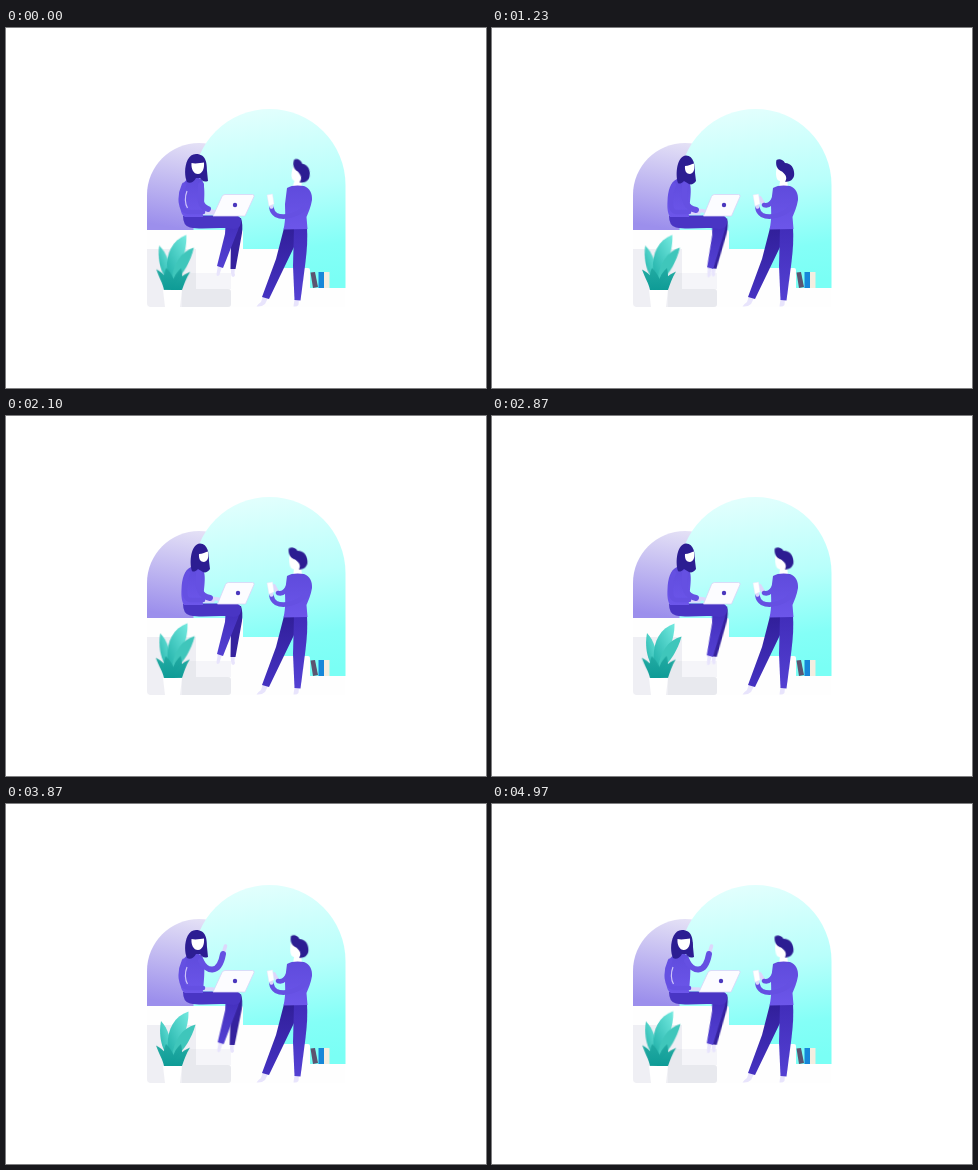
An HTML page for the animation above (5010 ms loop, 480 px wide and 360 px high).

```html
<!DOCTYPE html>
<html lang="en">
<head>
<meta charset="utf-8">
<title>Two colleagues</title>
<style>
html, body { margin: 0; width: 100%; height: 100%; overflow: hidden; background: #fff; }
svg { display: block; width: 480px; height: 360px; }

.move { animation: 5010ms ease-in-out infinite; }
.sleeve { fill: none; stroke: #6550e2; stroke-width: 6; stroke-linecap: round; stroke-linejoin: round; }
.sleeve.thin { stroke-width: 4.6; }
.hand { fill: none; stroke: #ddd7fb; stroke-width: 3.6; stroke-linecap: round; }
.hair { fill: #2c1d92; }
.skin { fill: #fff; }
.foot { fill: #e8e4fc; }

/* Seated woman */
.front-leg, .back-leg { transform-origin: 229px 192px; }
.front-leg { animation-name: front-leg; }
.back-leg { animation-name: back-leg; }
@keyframes front-leg {
  0%, 41.8%, 84% { transform: rotate(0); }
  20.5%, 24.5%, 60% { transform: rotate(-5deg); }
  57.3%, 99.2%, 100% { transform: rotate(-4.6deg); }
  69.9% { transform: rotate(-1.8deg); }
}
@keyframes back-leg {
  0%, 41.8%, 84% { transform: rotate(0); }
  20.5%, 24.5%, 60% { transform: rotate(6deg); }
  57.3%, 99.2%, 100% { transform: rotate(5.6deg); }
  69.9% { transform: rotate(2.2deg); }
}
.bob { animation-name: bob; }
@keyframes bob {
  0%, 6%, 69%, 100% { d: path("M181 154C177 146 179 126 190 126C200 126 201 135 201 143L202 153C198 154.500 196 153 194 150L190 150C188 154 184 156 181 154Z"); }
  19%, 58.5% { d: path("M186 155C183 146 185 128 194 127.500C202 128 203 137 203 145L204 153C202 156 199 157 197 156L192 153C189 156 187 156 186 155Z"); }
}
.face { animation-name: face; }
@keyframes face {
  0%, 6%, 69%, 100% { d: path("M185.500 135C189 136 195 135 198 134.500C198.500 141 196.500 145.500 192 146C187.500 146 185 141 185.500 135Z"); }
  19%, 58.5% { d: path("M193 138C196 138 200 136 202 135.500C203 141 202 145 198 146C194.500 146 192.500 143 193 138Z"); }
}
.seam { animation-name: seam; }
@keyframes seam {
  0%, 6%, 69%, 100% { opacity: .9; }
  18%, 59% { opacity: 0; }
}
.torso { animation-name: torso; }
@keyframes torso {
  0%, 6%, 69%, 100% { d: path("M182 151C176 154 174 163 174 173C174 181 175 187 179 189L197 189C198 176 200 158 196 152C193 149 186 149 182 151Z"); }
  19%, 58.5% { d: path("M185 151C178 154 176 163 175.500 173C175 181 176 186 178 189L197 189C197 176 201 160 197 154C194 150 189 149 185 151Z"); }
}
.near-arm { animation-name: near-arm; }
@keyframes near-arm {
  0%, 6%, 69%, 100% { d: path("M178 157C173 168 173.500 183 182 184L197 184"); }
  19%, 58.5% { d: path("M182 157C177.500 168 177 183 184 184L197 184"); }
}
.wave { animation-name: wave; }
@keyframes wave {
  0%, 6% { d: path("M195 157C195 168 192 178 202 181"); }
  19%, 60% { d: path("M193 157C191 171 193 180 204 182"); }
  69.9% { d: path("M195 157C196 172 200 178 212 169"); }
  77%, 99.2%, 100% { d: path("M195 157C200 167 213 172 217 150"); }
  84.6%, 91% { d: path("M195 157C200 167 213 172 214 149"); }
}
.palm { animation-name: palm; }
@keyframes palm {
  0%, 6% { d: path("M202 182L209 184"); }
  19%, 60% { d: path("M204 182L212 183"); }
  69.9% { d: path("M212 169L219 165"); }
  77%, 99.2%, 100% { d: path("M217 150L219.500 142"); }
  84.6%, 91% { d: path("M214 149L215.500 141"); }
}
.screen { animation-name: screen; }
@keyframes screen {
  0%, 6%, 69%, 100% { d: path("M219 166.500L246.500 166.500Q248.500 166.500 248 168.500L239 188L207 188L216 168.500Q217 166.500 219 166.500Z"); }
  19%, 58.5% { d: path("M222.500 166.500L246.500 166.500Q248.500 166.500 248 168.500L239.500 188L211.500 188L219.500 168.500Q220.500 166.500 222.500 166.500Z"); }
}
.dot { animation-name: dot; }
@keyframes dot {
  0%, 6%, 69%, 100% { transform: none; }
  19%, 58.5% { transform: translateX(3px); }
}

/* Standing man */
.nod { transform-origin: 290px 156px; animation-name: nod; }
@keyframes nod {
  0%, 5% { transform: rotate(9deg); }
  24.5% { transform: rotate(0); }
  41.9%, 58% { transform: rotate(-4deg); }
  69.9% { transform: rotate(5deg); }
  84.6% { transform: rotate(-2deg); }
  99.2%, 100% { transform: rotate(-4deg); }
}
.reach { animation-name: reach; }
@keyframes reach {
  0%, 5% { opacity: 0; }
  12%, 100% { opacity: 1; }
}

/* Plant */
.leaf { transform-origin: 167px 258px; animation-name: sway; }
.leaf.low { animation-name: sway-low; }
@keyframes sway {
  0%, 24.5% { transform: rotate(-2.5deg); }
  57.3%, 84.6% { transform: rotate(0); }
  99.2%, 100% { transform: rotate(-1.5deg); }
}
@keyframes sway-low {
  0%, 100% { transform: rotate(1deg); }
  50% { transform: rotate(-1deg); }
}
</style>
</head>
<body>
<svg viewBox="0 0 480 360">
  <defs>
    <linearGradient id="lilac" x1=".65" y1="0" x2=".45" y2="1">
      <stop offset="0" stop-color="#e6e3f6"/><stop offset="1" stop-color="#9c8fec"/>
    </linearGradient>
    <linearGradient id="aqua" x1=".44" y1="0" x2=".56" y2="1">
      <stop offset="0" stop-color="#e2fffd"/><stop offset=".45" stop-color="#b8fffb"/>
      <stop offset=".8" stop-color="#84fff7"/><stop offset="1" stop-color="#7afff5"/>
    </linearGradient>
    <linearGradient id="shirt" x1="0" y1="0" x2="0" y2="1">
      <stop offset="0" stop-color="#5f4bdc"/><stop offset="1" stop-color="#6c56ea"/>
    </linearGradient>
    <linearGradient id="jeans" x1="0" y1="0" x2="0" y2="1">
      <stop offset="0" stop-color="#412dba"/><stop offset="1" stop-color="#5340d2"/>
    </linearGradient>
    <linearGradient id="shade" x1="0" y1="0" x2="0" y2="1">
      <stop offset="0" stop-color="#311f9a"/><stop offset="1" stop-color="#4532c2"/>
    </linearGradient>
    <linearGradient id="mint" x1="1" y1="0" x2="0" y2="1">
      <stop offset="0" stop-color="#74eae0"/><stop offset="1" stop-color="#1fb0a8"/>
    </linearGradient>
    <linearGradient id="teal" x1="0" y1="0" x2="0" y2="1">
      <stop offset="0" stop-color="#22aaa2"/><stop offset="1" stop-color="#0e9b96"/>
    </linearGradient>
  </defs>

  <!-- Arches -->
  <path fill="url(#lilac)" d="M141 203V167A52 52 0 0 1 245 167V203Z"/>
  <path fill="url(#aqua)" d="M187.500 260V157A76 76 0 0 1 339.500 157V260Z"/>

  <!-- Stairs -->
  <path fill="#fefefe" d="M141 202H235Q237 202 237 204V221H276V240H302Q304 240 304 242V260H339V279H141Z"/>
  <path fill="#efeff4" d="M141 221H190V262H176V279H145Q141 279 141 275Z"/>
  <path fill="#e8e9ee" d="M176 247Q176 245 178 245H190V261H222Q225 261 225 264V276Q225 279 222 279H176Z"/>
  <path fill="#f5f5f9" d="M190 245H225V261H190Z"/>

  <!-- Books -->
  <path fill="#5c5470" d="M304.500 244.500L309 244L312 259L307 260Z"/>
  <rect fill="#1687d9" x="312.500" y="244" width="5.500" height="16"/>
  <rect fill="#f4eee0" x="318" y="244" width="5.500" height="16"/>

  <!-- Plant -->
  <path class="leaf move" fill="url(#mint)" d="M160 250C154 240 153 227 155 217C162 224 166 237 166 252Z"/>
  <path class="leaf move" fill="url(#mint)" d="M162 248C160 229 166 213 182.500 207.500C183 222 176 239 167 251Z"/>
  <path class="leaf move" fill="#3fc6bb" d="M166 253C168 236 176 224 189.500 220.500C186 234 178 246 170 253Z"/>
  <g class="leaf low move" fill="url(#teal)">
    <path d="M158 262C157 256 153 250 150 241.500C157 245 164 252 167 262Z"/>
    <path d="M161 262C157 254 157 246 160 240C166 246 170 254 170 262Z"/>
    <path d="M165 262C166 252 169 245 175 240C177 249 176 257 173 262Z"/>
    <path d="M167 262C169 253 176 247 184 243.500C180 250 178 256 176 262Z"/>
  </g>
  <path fill="#fff" d="M157 262H176L174 279H159Z"/>

  <!-- Seated woman -->
  <g class="back-leg move">
    <path class="foot" d="M225 239L229 239L228.500 245Q230 248 227 249Q225 248 225 245Z"/>
    <path fill="#35229e" d="M222 190L235 190Q237 196 236 205L229.500 241L224.500 241L225 210Z"/>
  </g>
  <g class="front-leg move">
    <path class="foot" d="M212 237L216 239L214 245Q214 248 211 248Q210 246 211 243Z"/>
    <path fill="url(#jeans)" d="M220 190L233 189Q235 194 232 202L217 240L211 238L219 206Z"/>
  </g>
  <path fill="#4935c4" d="M177 188C190 187 226 187.500 232 188Q237 191 234 198Q231 202 224 200.500C210 199 196 202 184 199.500Q177 198 177 188Z"/>
  <path class="torso move" fill="url(#shirt)" d="M182 151C176 154 174 163 174 173C174 181 175 187 179 189L197 189C198 176 200 158 196 152C193 149 186 149 182 151Z"/>
  <path class="hand" d="M198 185L207 185"/>
  <path class="sleeve thin near-arm move" d="M178 157C173 168 173.500 183 182 184L197 184"/>
  <path class="seam move" fill="none" stroke="#d8d0fb" stroke-width="1.200" d="M181 163C178.500 169 179 176 181.500 180"/>
  <path class="hand palm move" d="M202 182L209 184"/>
  <path class="sleeve wave move" d="M195 157C195 168 192 178 202 181"/>
  <path class="hair bob move" d="M181 154C177 146 179 126 190 126C200 126 201 135 201 143L202 153C198 154.500 196 153 194 150L190 150C188 154 184 156 181 154Z"/>
  <path class="skin face move" d="M185.500 135C189 136 195 135 198 134.500C198.500 141 196.500 145.500 192 146C187.500 146 185 141 185.500 135Z"/>
  <path class="screen move" fill="#fcfcff" stroke="#d9d4f6" stroke-width=".8" d="M219 166.500L246.500 166.500Q248.500 166.500 248 168.500L239 188L207 188L216 168.500Q217 166.500 219 166.500Z"/>
  <circle class="dot move" fill="#4a37bd" cx="229" cy="177" r="2.200"/>

  <!-- Standing man -->
  <path class="foot" d="M257 268L262 270L259 276Q256 279 250.500 278.500Q252 276 255 274Z"/>
  <path class="foot" d="M288.500 271L293 271L292.500 277Q291 279 287.500 278.500Z"/>
  <path fill="url(#shade)" d="M278 200L292 200L289 217L263 271L256 269L270 231Z"/>
  <path fill="url(#jeans)" d="M288 200L301 200Q302 214 299.500 234L294.500 272.500L288.500 272L287 238Z"/>
  <g class="nod move">
    <path class="skin" d="M285 138C283 145 284 153 288 153L287 160H296L295 150C299 144 295 136 291 136Z"/>
    <path class="hair" d="M284.500 132C287 130.500 291 131 293 135C300 135 303 142 302 148C301 152 297 154.500 293 153.500C296 149 293 146 290 143.500C286 142 283 138 284.500 132Z"/>
  </g>
  <g class="reach move">
    <path class="hand" d="M272 177L268 170"/>
    <path class="sleeve thin" d="M283 168Q279 179 272 177"/>
  </g>
  <path fill="url(#shirt)" d="M281 160C285 157 293 157 298 158C304 160 306.500 166 306 172C305 179 302 185 300.500 189L301.500 201L277.500 201.500C280 191 279 183 279 176Z"/>
  <path class="sleeve thin" d="M300 178C293 187 278 191 270 187Q266 184 265.500 180"/>
  <path class="hand" d="M265.500 179L265 174"/>
  <path fill="#fff" stroke="#e8e5fa" stroke-width=".5" d="M261 167L266.500 166L268 176L263 178Z"/>
</svg>
</body>
</html>
```
